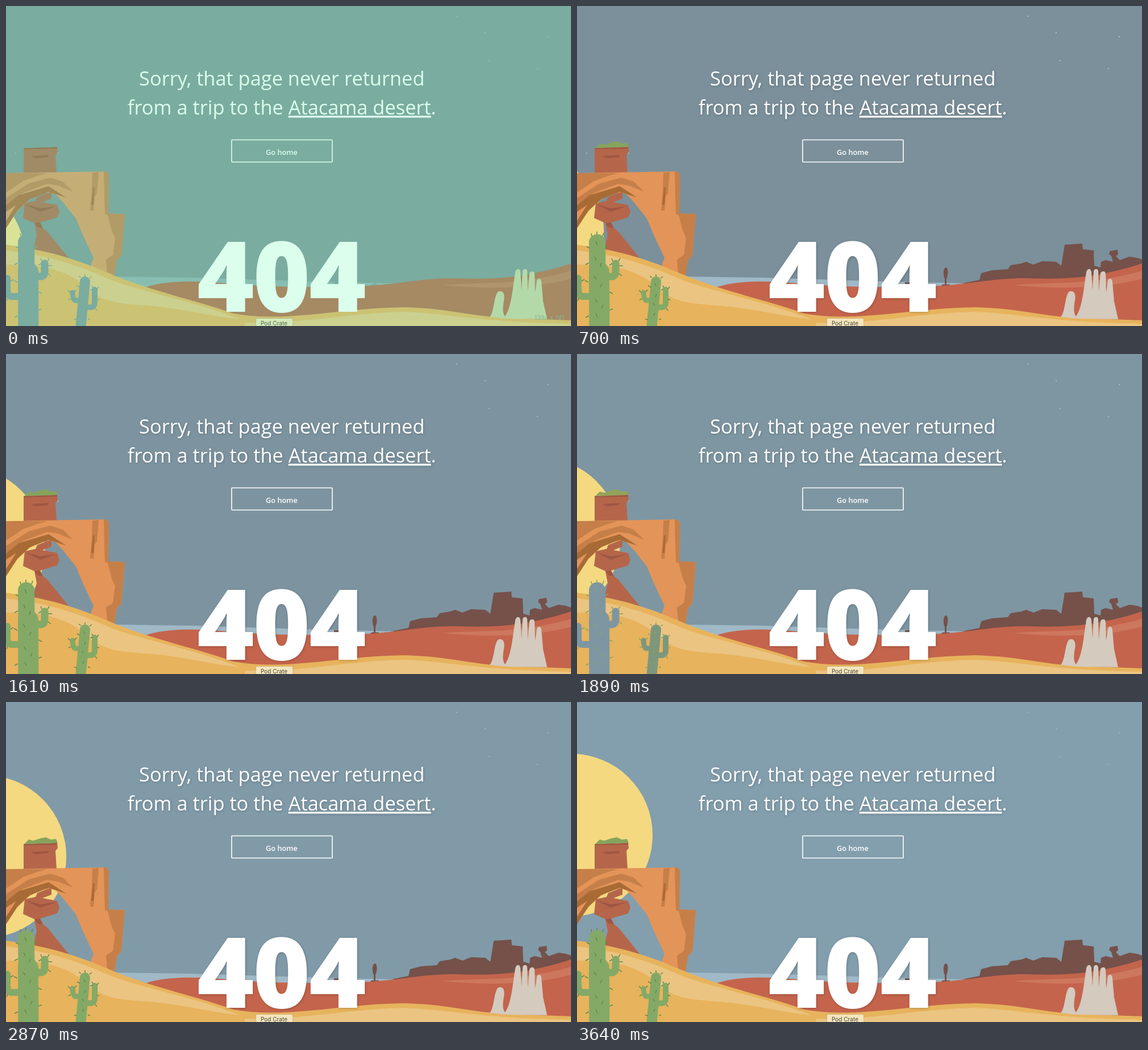
Animation of 994x563 px, one loop 3.71 s. Source, as an HTML page:

```html
<!DOCTYPE html>
<html lang="en">
<head>
<meta charset="utf-8">
<title>404</title>
<style>
  html, body { margin: 0; height: 100%; overflow: hidden; }
  svg { display: block; width: 994px; height: 563px; font-family: "Open Sans", sans-serif; background: var(--sky); }
  svg {
    --sun: #f4d981; --sea: #a0b9c7; --mesa: #75514a; --dune: #c4644c; --dune-light: #cd775e;
    --rock: #e39458; --rock-dark: #c67f48; --rock-deep: #a86b35;
    --rust: #b5664a; --rust-dark: #9f5642; --sand: #e7b35c; --sand-light: #ebc481;
    --hand: #d4cabe; --ink: #fff; --cactus: #84a967; --small: #84a967; --spine: #628a4c; --bush: #86a45c;
    --tip: #f4e5bd; --tip-ink: #4c473b; --shade: #0003;
  }
  .faded { --cactus: var(--sky); --small: #7d977d; --spine: #91a25a; --bush: #93a35a; }
  .tinted {
    --sun: #dae298; --sea: #87beb1; --mesa: var(--sky); --dune: #a58a64; --dune-light: #ae956e;
    --rock: #c5ae76; --rock-dark: #b19b66; --rock-deep: #a18958;
    --rust: #a18b66; --rust-dark: #927b59; --sand: #cbc273; --sand-light: #cbd08e;
    --hand: #b4d9a8; --ink: #dbffec; --small: var(--sky); --spine: var(--sky); --bush: var(--sky);
    --tip: #d4e9b9; --tip-ink: #4d6b57; --shade: #0000;
  }
  text { fill: var(--ink); text-anchor: middle; }
  .shadow { filter: drop-shadow(1px 1px 2px var(--shade)); }
  .limb { fill: none; stroke-linecap: round; stroke-linejoin: round; }
  .spines { fill: none; stroke: var(--spine); stroke-width: 1.5; }
</style>
</head>
<body>
<svg id="scene" viewBox="0 0 994 563">
  <g id="stars" fill="#fff"></g>
  <circle id="sun" r="143" fill="var(--sun)"/>

  <path fill="var(--sea)" d="M188 476L330 478 520 484 680 488 650 494H188z"/>
  <g fill="var(--mesa)">
    <path d="M675 494L682 487 708 482 711 470 730 465 758 463 763 456 782 453 790 450 803 455 818 449 843 450 852 457 858 420 889 418 890 428 909 430 910 457 921 460 922 450 930 447 943 450 940 440 936 436 938 431 951 429 952 437 948 440 955 447 972 441 985 443 994 446V494z"/>
    <path d="M638 494Q644 488 647 490V480C643 472 645 460 649 460S654 472 650 480V490Q656 488 660 494zM577 486h9v5h-9z"/>
  </g>
  <path fill="var(--dune)" d="M248 494C290 481 340 484 400 489S560 497 640 492C700 488 740 478 790 479 860 481 910 480 994 453V563H248z"/>
  <path fill="var(--dune-light)" d="M768 491C830 485 900 493 994 466V480C930 497 850 499 768 491z"/>

  <path fill="var(--rust)" d="M31 250L90 248 91 257 87 262 89 294H31zM55 336L80 326 80 339 64 345 90 350 94 362 90 372 60 381 66 392 72 396 110 443 47 433 54 403 50 382 30 373 33 347 52 343z"/>
  <path fill="var(--rust-dark)" d="M31 250L90 248 90 251 32 252zM44 264L75 262 74 266 52 268zM34 349L60 356 89 352 60 362zM50 382L60 381 64 391 55 389z"/>
  <path fill="var(--bush)" d="M32 250L40 242 48 244 60 240 70 238 79 242 88 241 91 248z"/>

  <path fill="var(--rock)" d="M0 294L176 291 181 296 180 365 209 366 203 438 195 448 191 474 150 462 150 453 154 443 136 405 123 374 100 345 88 332 78 328 60 331 40 342 20 361 0 391z"/>
  <path fill="var(--rock-dark)" d="M0 294H72L55 299 30 308 0 328zM0 338L40 312 78 302 100 309 118 327 92 316 72 313 30 329 0 352zM152 293L163 292 160 330 156 335 154 360 148 360 151 325zM172 291L176 291 181 296 180 365 209 366 203 438 195 448 191 474 178 469 176 446 188 438 192 408 186 395 179 368 174 366 173 335z"/>
  <path fill="var(--rock-deep)" d="M0 351L22 333 75 317 106 337 75 327 42 340 20 360 0 391V378L18 350 0 362zM153 320L156 318 154 350 150 350z"/>

  <path fill="var(--sand)" d="M0 420C70 429 125 445 190 474 270 506 330 516 400 541 490 558 590 531 700 530 780 532 810 545 880 549L994 553V563H0z"/>
  <path fill="var(--sand-light)" d="M0 430C70 438 120 453 185 482 250 506 330 519 412 551 360 546 320 534 260 528 210 524 180 524 150 503 115 466 70 454 0 455zM420 557C520 560 600 540 700 538 790 542 830 556 994 559V563H420z"/>
  <path fill="var(--hand)" d="M851 547C860 537 858 506 867 502 875 500 878 508 876 518 874 530 873 540 878 546 889 530 891 500 896 468 898 461 904 461 905 468L907 500 909 466C911 461 917 462 917 467L918 502 921 470C924 465 930 466 930 472L931 504 934 483C937 477 942 480 942 486L945 520 952 551 880 550z"/>

  <g class="limb" stroke="var(--cactus)">
    <path stroke-width="29" d="M35.500 416L36 470"/>
    <path stroke-width="36" d="M39 468L39.500 600"/>
    <path stroke-width="13" d="M50 476H60Q68 476 68 467V453"/>
    <path stroke-width="12" d="M24 511H10Q3 511 2 500V479"/>
  </g>
  <g class="limb" stroke="var(--small)">
    <path stroke-width="18" d="M139 485L129 590"/>
    <path stroke-width="10" d="M136 530H148Q156 530 156 521V499"/>
    <path stroke-width="9" d="M130 518H122Q118 518 117 504"/>
  </g>
  <path class="spines" d="M26 405l-1-5M35 402v-5M45 405l2-6M22 426l-5-3M50 425l5-3M21 452l-6 3M57 456l5-3M20 486l-6-3M57 503l6 3M57 535l6-2M21 545l-6 3M63 449l-2-5M73 449l3-5M74 457l7 0M74 471l5 4M0 478l-1-5M8 484l5-3M3 514l-2 5
    M33 414l3 7M31 441l3 6M43 452l-2 7M30 475l4 6M44 489l-3 6M32 515l3 6M46 526l-3 6M33 542l3 6
    M132 478l-4-3M139 476v-4M147 479l4-3M130 495l-5-3M148 500l4-2M144 550l4 2M125 552l-5-1M113 504l-4-4M121 503l3-4M114 515l-4 2M153 496l-2-4M160 498l3-4M160 516l4 1M157 532l3 4
    M137 488l2 5M140 507l-2 5M134 522l2 5M137 540l-2 5"/>

  <text class="shadow" x="386.500 485 583.500" y="538" font-size="172" font-weight="800">404</text>

  <g class="shadow" font-size="34.4">
    <text x="485.300" y="140">Sorry, that page never returned</text>
    <text x="485.300" y="191">from a trip to the <tspan text-decoration="underline">Atacama desert</tspan>.</text>
  </g>
  <rect x="397" y="235.500" width="177" height="39" rx="1" fill="none" stroke="var(--ink)" stroke-width="1.6"/>
  <text x="485" y="261.500" font-size="12.8" font-weight="600">Go home</text>

  <rect x="439.500" y="549.500" width="65" height="20" rx="2" fill="var(--tip)" stroke="#0002"/>
  <text x="471.500" y="562" font-size="10" font-family="Inter, sans-serif" style="fill: var(--tip-ink)">Pod Crate</text>
  <text id="size" x="956" y="552" font-size="10.500" font-family="Inter, sans-serif" style="fill: #8fb391">1394 x 791</text>
</svg>
<script>
  const LOOP = 3710, STEP = 70;
  const [scene, sun, stars, size] = ["scene", "sun", "stars", "size"].map(id => document.getElementById(id));

  stars.innerHTML = [[793, 18], [843, 47], [954, 54], [850, 96], [935, 110], [17, 259], [91, 259]]
    .map(([x, y]) => `<circle cx="${x}" cy="${y}" r="0.9"/>`).join("");

  const mix = (a, b, u) => a.map((v, i) => v + (b[i] - v) * u);

  function draw(now) {
    const t = Math.floor(now % LOOP / STEP) * STEP;
    const u = (t - STEP) / (LOOP - 2 * STEP);
    const tinted = t < STEP;
    const faded = t < 350 || (t >= 1750 && t < 2100);

    sun.setAttribute("cx", -108 + 64 * u + 34 * u * u);
    sun.setAttribute("cy", 439 - 242 * u + 37 * u * u);
    scene.style.setProperty("--sky", tinted ? "#7aac9f" : `rgb(${mix([121, 141, 151], [131, 158, 173], u)})`);
    scene.setAttribute("class", (faded ? "faded " : "") + (tinted ? "tinted" : ""));
    stars.setAttribute("opacity", tinted ? 0.3 : 0.65 - 0.35 * u);
    size.setAttribute("opacity", tinted ? 1 : 0);
    requestAnimationFrame(draw);
  }
  requestAnimationFrame(draw);
</script>
</body>
</html>
```
